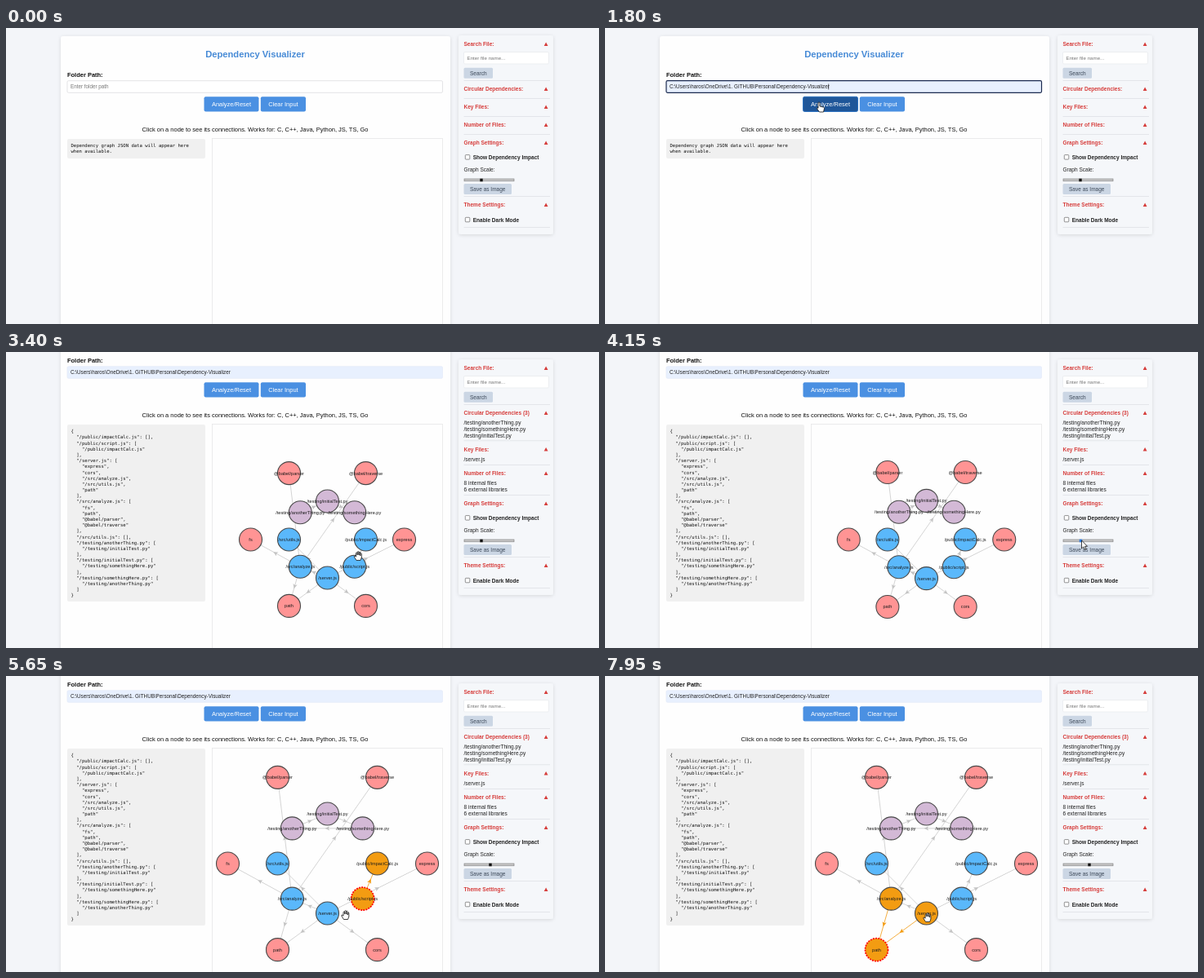
These frames come from a looping animation (726x363 px, 8 s). An HTML page:

```html
<!DOCTYPE html>
<html lang="en">
<head>
<meta charset="utf-8">
<title>Dependency Visualizer</title>
<style>
  html, body { margin: 0; width: 100%; height: 100%; overflow: hidden; background: #f3f5f9; }
  svg { display: block; width: 100%; height: 100%; }
  text { font-family: "Liberation Sans", Arial, sans-serif; white-space: pre; }
  .bold { font-weight: bold; }
  .mid { text-anchor: middle; }
  .mono { font-family: "DejaVu Sans Mono", monospace; }
</style>
</head>
<body>
<svg id="stage" viewBox="0 0 726 363"></svg>
<script>
const LOOP = 8000;
const RESULT_AT = 2000;
const stage = document.getElementById('stage');

function add(parent, tag, attrs = {}) {
  const el = document.createElementNS('http://www.w3.org/2000/svg', tag);
  set(el, attrs);
  parent.appendChild(el);
  return el;
}
function set(el, attrs) {
  for (const key in attrs) el.setAttribute(key, attrs[key]);
}
function group(parent) { return add(parent, 'g'); }
function box(parent, x, y, width, height, fill, attrs) {
  return add(parent, 'rect', { x, y, width, height, fill, ...attrs });
}
function label(parent, x, y, content, size, attrs) {
  const el = add(parent, 'text', { x, y, 'font-size': size, fill: '#222', ...attrs });
  el.textContent = content;
  return el;
}
function show(el, on) { el.style.display = on ? '' : 'none'; }
function shift(el, x, y) { el.setAttribute('transform', `translate(${x} ${y})`); }
function ease(t, from, to) {
  const p = Math.min(1, Math.max(0, (t - from) / (to - from)));
  return p * p * (3 - 2 * p);
}

const dependencies = {
  '/public/impactCalc.js': [],
  '/public/script.js': ['/public/impactCalc.js'],
  '/server.js': ['express', 'cors', '/src/analyze.js', '/src/utils.js', 'path'],
  '/src/analyze.js': ['fs', 'path', '@babel/parser', '@babel/traverse'],
  '/src/utils.js': [],
  '/testing/anotherThing.py': ['/testing/initialTest.py'],
  '/testing/initialTest.py': ['/testing/somethingHere.py'],
  '/testing/somethingHere.py': ['/testing/anotherThing.py']
};
const inner = Object.keys(dependencies);
const innerOrder = ['/public/impactCalc.js', '/public/script.js', '/server.js', '/src/analyze.js',
  '/src/utils.js', '/testing/anotherThing.py', '/testing/initialTest.py', '/testing/somethingHere.py'];
const outerOrder = ['express', 'cors', 'path', 'fs', '@babel/parser', '@babel/traverse'];

// Main card
const defs = add(stage, 'defs');
const blur = add(defs, 'filter', { id: 'soft', x: '-10%', y: '-10%', width: '120%', height: '120%' });
add(blur, 'feDropShadow', { dx: 0, dy: 1, stdDeviation: 2, 'flood-color': '#000', 'flood-opacity': .12 });

const page = group(stage);
box(page, 67, 10, 477, 460, '#fefefe', { rx: 3, filter: 'url(#soft)' });
label(page, 305, 36.2, 'Dependency Visualizer', 11.2, { class: 'bold mid', fill: '#468ad6' });
label(page, 75, 60.2, 'Folder Path:', 7.47, { class: 'bold', fill: '#111' });
const field = box(page, 75, 64.7, 459.5, 14.6, '#fff', { rx: 1.5 });
const fieldText = label(page, 79, 74.3, '', 6.3);
const caret = box(page, 273.5, 68.5, .6, 7, '#111');

const analyze = box(page, 242.5, 84.3, 67, 18.2, '#4a90e2', { rx: 2 });
box(page, 311.8, 84.3, 55.2, 18.2, '#4a90e2', { rx: 2 });
label(page, 276, 96, 'Analyze/Reset', 7.47, { class: 'mid', fill: '#fff' });
label(page, 339.4, 96, 'Clear Input', 7.47, { class: 'mid', fill: '#fff' });
label(page, 305, 126.6, 'Click on a node to see its connections. Works for: C, C++, Java, Python, JS, TS, Go',
  7.47, { class: 'mid', fill: '#111' });

const codeBox = box(page, 75, 136, 169, 24, '#f0f0f0', { rx: 2 });
function codeBlock(lines) {
  const g = group(page);
  lines.forEach((line, i) =>
    label(g, 79.5, 146.3 + i * 7.18, line, 5.58, { class: 'mono', fill: '#111' }));
  return g;
}
const emptyCode = codeBlock(['Dependency graph JSON data will appear here', 'when available.']);
const fullCode = codeBlock(JSON.stringify(dependencies, null, 2).split('\n'));
box(page, 252.5, 135.5, 282, 310, 'none', { stroke: '#e6e6e8', 'stroke-width': .8 });

// Graph
const graph = group(page);
shift(graph, 393.5, 277);
const edgeLayer = group(graph), nodeLayer = group(graph);
const nodes = {};
function addNode(id, angle, ring, fill) {
  const g = group(nodeLayer);
  const circle = add(g, 'circle', { r: 14 });
  label(g, 0, 2, id, 5.6, { class: 'mid', fill: '#1c1c1c' });
  nodes[id] = { g, circle, fill, ux: Math.cos(angle) * ring, uy: Math.sin(angle) * ring };
}
outerOrder.forEach((id, i) => addNode(id, i * Math.PI / 3, 2, '#ff9494'));
innerOrder.forEach((id, i) =>
  addNode(id, i * Math.PI / 4, 1, id.startsWith('/testing') ? '#d3b9d6' : '#5ab8fb'));
const edges = inner.flatMap(from => dependencies[from].map(to => ({
  from, to,
  line: add(edgeLayer, 'line', { 'stroke-width': .9 }),
  arrow: add(edgeLayer, 'path', { d: 'M3 0L-2.6 -2.6L-1.4 0L-2.6 2.6Z' })
})));

function drawGraph(scale, selected) {
  const lit = new Set([selected]);
  for (const e of edges) {
    const a = nodes[e.from], b = nodes[e.to];
    const active = e.from === selected || e.to === selected;
    if (active) lit.add(e.from).add(e.to);
    const x1 = a.ux * scale, y1 = a.uy * scale, x2 = b.ux * scale, y2 = b.uy * scale;
    const turn = Math.atan2(y2 - y1, x2 - x1) * 180 / Math.PI;
    set(e.line, { x1, y1, x2, y2, stroke: active ? '#f3a52c' : '#d0d0d0' });
    set(e.arrow, {
      transform: `translate(${(x1 + x2) / 2} ${(y1 + y2) / 2}) rotate(${turn})`,
      fill: active ? '#f39c12' : '#c4c4c4'
    });
  }
  for (const id in nodes) {
    const n = nodes[id], chosen = id === selected;
    shift(n.g, n.ux * scale, n.uy * scale);
    set(n.circle, {
      fill: lit.has(id) ? '#f39c12' : n.fill,
      stroke: chosen ? '#f00' : '#484848',
      'stroke-width': chosen ? 1.7 : 1.1,
      'stroke-dasharray': chosen ? '2 1.2' : 'none'
    });
  }
}

// Sidebar
const side = group(stage);
const panel = box(side, 554, 9, 116, 244, '#f5f7fa', { rx: 3, filter: 'url(#soft)' });
function heading(parent, y, title) {
  add(parent, 'path', { d: `M658.7 ${y + 2}h4.8l-2.4 -4.4z`, fill: '#d63c3a' });
  return label(parent, 560.5, y + 2.3, title, 6.53, { class: 'bold', fill: '#d63c3a' });
}
function rule(parent, y) { box(parent, 560.5, y, 105.5, .7, '#dcdfe4'); }
function sideButton(parent, y, width, title) {
  box(parent, 560.5, y, width, 13, '#cbd6e4', { rx: 1.5 });
  label(parent, 560.5 + width / 2, y + 8.8, title, 6.53, { class: 'mid', fill: '#3c4858' });
}
function checkRow(parent, y, title) {
  box(parent, 562.3, y - 3.4, 5.5, 5.5, '#fff', { rx: .8, stroke: '#666', 'stroke-width': .7 });
  label(parent, 571.7, y + 2.3, title, 6.53, { class: 'bold' });
}
function list(y, lines) {
  lines.forEach((line, i) => label(results, 560.5, y + 2.3 + i * 7.6, line, 6.53));
}

heading(side, 20, 'Search File:');
box(side, 560.5, 29.5, 104, 14.5, '#fff', { rx: 1.5, stroke: '#e3e6ea', 'stroke-width': .6 });
label(side, 564.5, 38.7, 'Enter file name...', 6.2, { fill: '#777' });
sideButton(side, 48.7, 35.5, 'Search');
rule(side, 64.3);
const circular = heading(side, 75, '');

const keyFiles = group(side);
rule(keyFiles, 86);
heading(keyFiles, 97, 'Key Files:');
const fileCount = group(side);
rule(fileCount, 108);
heading(fileCount, 119, 'Number of Files:');
const settings = group(side);
rule(settings, 130);
heading(settings, 141, 'Graph Settings:');
checkRow(settings, 159, 'Show Dependency Impact');
label(settings, 560.5, 175.5, 'Graph Scale:', 6.53);
box(settings, 561, 185, 61, 2.8, '#c9c9c9', { stroke: '#777', 'stroke-width': .6 });
const thumb = box(settings, 0, 184.7, 3.4, 3.6, '#111');
sideButton(settings, 191, 58.5, 'Save as Image');
rule(settings, 206.3);
heading(settings, 217, 'Theme Settings:');
checkRow(settings, 235.7, 'Enable Dark Mode');
rule(settings, 244);

const results = group(side);
list(87, ['/testing/anotherThing.py', '/testing/somethingHere.py', '/testing/initialTest.py']);
list(131.7, ['/server.js']);
list(161, ['8 internal files', '6 external libraries']);

// Pointer shapes and route: time, x, y, shape shown from then on
const shapes = {
  arrow: 'M0 0V10L2.3 7.9L4 11.4L5.6 10.7L4 7.3H7Z',
  beam: 'M-1.5 -4H1.5M0 -4V4M-1.5 4H1.5',
  point: 'M0 0q1 0 1 1v4l4.5 1.1q1.1 .4 1 1.6l-1 4.3h-5l-3.2 -4.4q.3 -1.4 1.7 -.3V1q0 -1 1 -1z',
  grab: 'M-2.5 5.5L-5.2 1q0 -1.4 1.3 -.8l1 1V-3.5q.9 -1.2 1.7 0V-1V-4.8q.9 -1.2 1.8 0V-1V-4.2' +
    'q.9 -1.1 1.7 0V0V-2.6q.8 -1 1.6 0V2L2.6 5.5Z'
};
const route = [
  [50, 620, 205, 'arrow'], [400, 150, 74, 'beam'], [650, 150, 74, 'beam'],
  [900, 160, 92, 'arrow'], [1450, 160, 92, 'arrow'], [1750, 262, 91, 'point'],
  [1950, 262, 91, 'point'], [2000, 275, 91, 'arrow'], [2300, 489, 93, 'arrow'],
  [2700, 489, 93, 'arrow'], [2850, 450, 170, 'grab'], [3100, 395, 258, 'grab'],
  [3250, 395, 258, 'grab'], [3400, 431, 250, 'grab'], [3700, 555, 236, 'arrow'],
  [3900, 582, 231, 'arrow'], [4100, 582, 231, 'arrow'], [4500, 594, 231, 'arrow'],
  [4800, 594, 231, 'arrow'], [4950, 530, 245, 'grab'], [5250, 437, 276, 'grab'],
  [5450, 437, 276, 'grab'], [5650, 416, 293, 'grab'], [6000, 394, 296, 'grab'],
  [6400, 394, 296, 'grab'], [6800, 334, 337, 'grab'], [7550, 334, 337, 'grab'],
  [7900, 395, 296, 'grab']
];
const pointer = add(stage, 'path', {
  fill: '#fff', stroke: '#111', 'stroke-width': .8, 'stroke-linejoin': 'round'
});
function drawPointer(t) {
  const i = route.findLastIndex(stop => stop[0] <= t);
  show(pointer, i >= 0);
  if (i < 0) return;
  const [from, x, y, shape] = route[i];
  const [to, nx, ny] = route[i + 1] || [LOOP, x, y];
  const p = (t - from) / (to - from);
  shift(pointer, x + (nx - x) * p, y + (ny - y) * p);
  pointer.setAttribute('d', shapes[shape]);
}

function selectedAt(t) {
  if (t >= 7500) return 'path';
  if (t >= 6300) return '/server.js';
  if (t >= 5350) return '/public/script.js';
  return null;
}

function render(t) {
  const done = t >= RESULT_AT, filled = t >= 1250;
  const focused = t >= 650 && t < 1950, pressed = t >= 1700 && t < RESULT_AT;
  shift(page, 0, -47 * ease(t, 2350, 2665));

  set(field, {
    fill: filled ? '#e8f0fe' : '#fff',
    stroke: focused ? '#1b2a4f' : filled ? '#e3eaf8' : '#d8d8dc',
    'stroke-width': focused ? 1.2 : .7
  });
  fieldText.textContent = filled
    ? 'C:\\Users\\haros\\OneDrive\\1. GITHUB\\Personal\\Dependency-Visualizer' : 'Enter folder path';
  fieldText.setAttribute('fill', filled ? '#222' : '#777');
  show(caret, focused && filled);
  set(analyze, { fill: pressed ? '#1f5699' : '#4a90e2', stroke: pressed ? '#2d72c0' : 'none' });

  codeBox.setAttribute('height', done ? 217 : 24);
  show(emptyCode, !done);
  show(fullCode, done);
  show(graph, done);
  show(results, done);
  circular.textContent = done ? 'Circular Dependencies (3)' : 'Circular Dependencies:';
  shift(keyFiles, 0, done ? 22.5 : 0);
  shift(fileCount, 0, done ? 30 : 0);
  shift(settings, 0, done ? 45 : 0);
  panel.setAttribute('height', done ? 289 : 244);

  const zoom = ease(t, 4100, 4500);
  set(thumb, { x: 580.3 + 11 * zoom, fill: t >= 3850 && t < 4850 ? '#2f7de0' : '#111' });
  if (done) drawGraph(47 + 14 * zoom, selectedAt(t));
  drawPointer(t);
}

const start = performance.now();
function tick() {
  render((performance.now() - start) % LOOP);
  requestAnimationFrame(tick);
}
tick();
</script>
</body>
</html>
```
